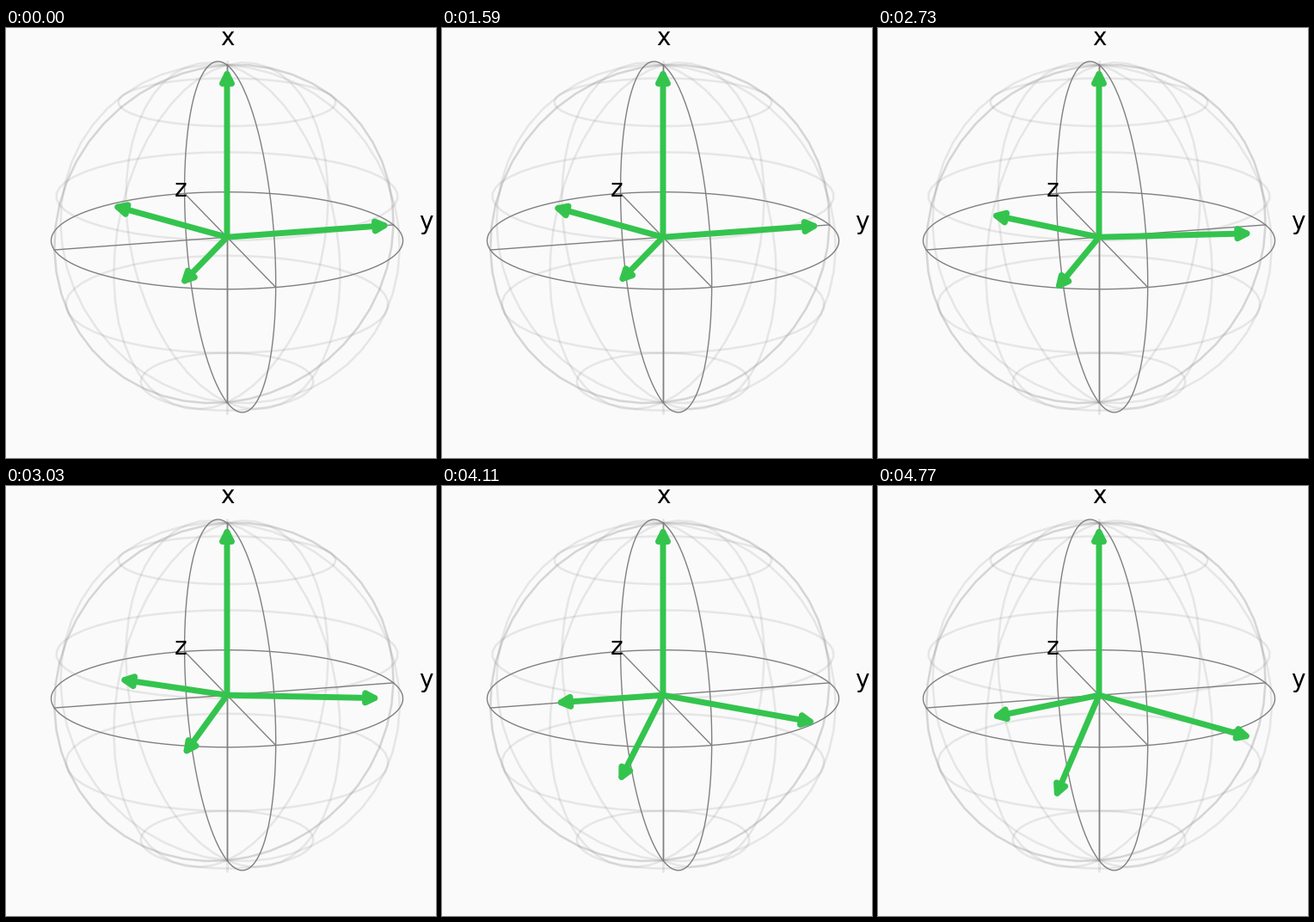
These frames come from a looping animation (500x500 px, 4.8 s). A matplotlib script:

```python
import numpy as np
import matplotlib.pyplot as plt
from matplotlib.animation import FuncAnimation
from matplotlib.collections import LineCollection
from matplotlib.patches import FancyArrowPatch

SIZE, DPI = 500, 100
FRAMES, INTERVAL = 160, 30
HALF = FRAMES // 2

CENTER = np.array([257.0, 243.2])
RADIUS, DISTANCE = 204, 13.5
ELEV, AZIM = np.radians(16), np.radians(-105)

BACK, GREEN, GRAY = "#fafafa", "#34c44e", "gray"

# Camera basis: right, up and towards the viewer
RIGHT = np.array([-np.sin(AZIM), np.cos(AZIM), 0])
VIEW = np.array([np.cos(ELEV) * np.cos(AZIM),
                 np.cos(ELEV) * np.sin(AZIM), np.sin(ELEV)])
UP = np.cross(VIEW, RIGHT)


def project(points):
    """Perspective projection of 3D points to stage pixels."""
    p = np.asarray(points, float)
    scale = RADIUS / (1 - p @ VIEW / DISTANCE)
    return CENTER + np.stack([p @ RIGHT * scale, -(p @ UP) * scale], axis=-1)


def sphere(u, v):
    """Points at longitude u and polar angle v, both in degrees."""
    u, v = np.broadcast_arrays(np.radians(u), np.radians(v))
    return np.stack([np.cos(u) * np.sin(v), np.sin(u) * np.sin(v), np.cos(v)], axis=-1)


fig = plt.figure(figsize=(SIZE / DPI, SIZE / DPI), dpi=DPI, facecolor=BACK)
ax = fig.add_axes([0, 0, 1, 1])
ax.set_xlim(0, SIZE)
ax.set_ylim(SIZE, 0)
ax.axis("off")

# Faint wireframe, built from a back and a front half
wires = []
for start in (0, -180):
    lon = start + np.linspace(0, 180, 25)
    lat = np.linspace(0, 180, 25)
    for k in (0, 5, 10, 15, 20, 24):
        wires.append(project(sphere(lon[k], lat)))
        wires.append(project(sphere(lon, lat[k])))
ax.add_collection(LineCollection(wires, colors=GRAY, alpha=0.16, linewidths=1.8, zorder=1))

# Two great circles and the three axes
turn = np.linspace(0, 360, 181)
lines = [sphere(turn, 90), sphere(90, turn)]
lines += [np.array([-axis, axis]) for axis in np.eye(3)]
for line in lines:
    ax.plot(*project(line).T, color=GRAY, lw=1, zorder=2)

for name, spot in (("x", (0, 0, 1.15)), ("y", (1.2, 0, 0)), ("z", (0, 1.1, 0))):
    ax.text(*project(spot), name, fontsize=20, family="DejaVu Sans",
            color="black", ha="center", va="center", zorder=4)


def add_arrow(tip):
    arrow = FancyArrowPatch(project((0, 0, 0)), project(tip), arrowstyle="-|>",
                            mutation_scale=20, lw=5, color=GREEN, zorder=3)
    ax.add_patch(arrow)
    return arrow


def tips(i):
    """Three spokes: first they shorten, then they sink to a tetrahedron."""
    shrink = min(i / (HALF - 1), 1)
    sink = max(i - HALF, 0) / (HALF - 1)
    r = 1 + (np.sqrt(8) / 3 - 1) * shrink
    return sphere(np.array([0, 120, 240]), 90) * r - [0, 0, sink / 3]


add_arrow((0, 0, 1))
spokes = [add_arrow(tip) for tip in tips(0)]


def update(i):
    for arrow, end in zip(spokes, project(tips(i))):
        arrow.set_positions(CENTER, end)
    return spokes


anim = FuncAnimation(fig, update, frames=FRAMES, interval=INTERVAL,
                     repeat=True, repeat_delay=0, blit=False)
plt.show()
```
